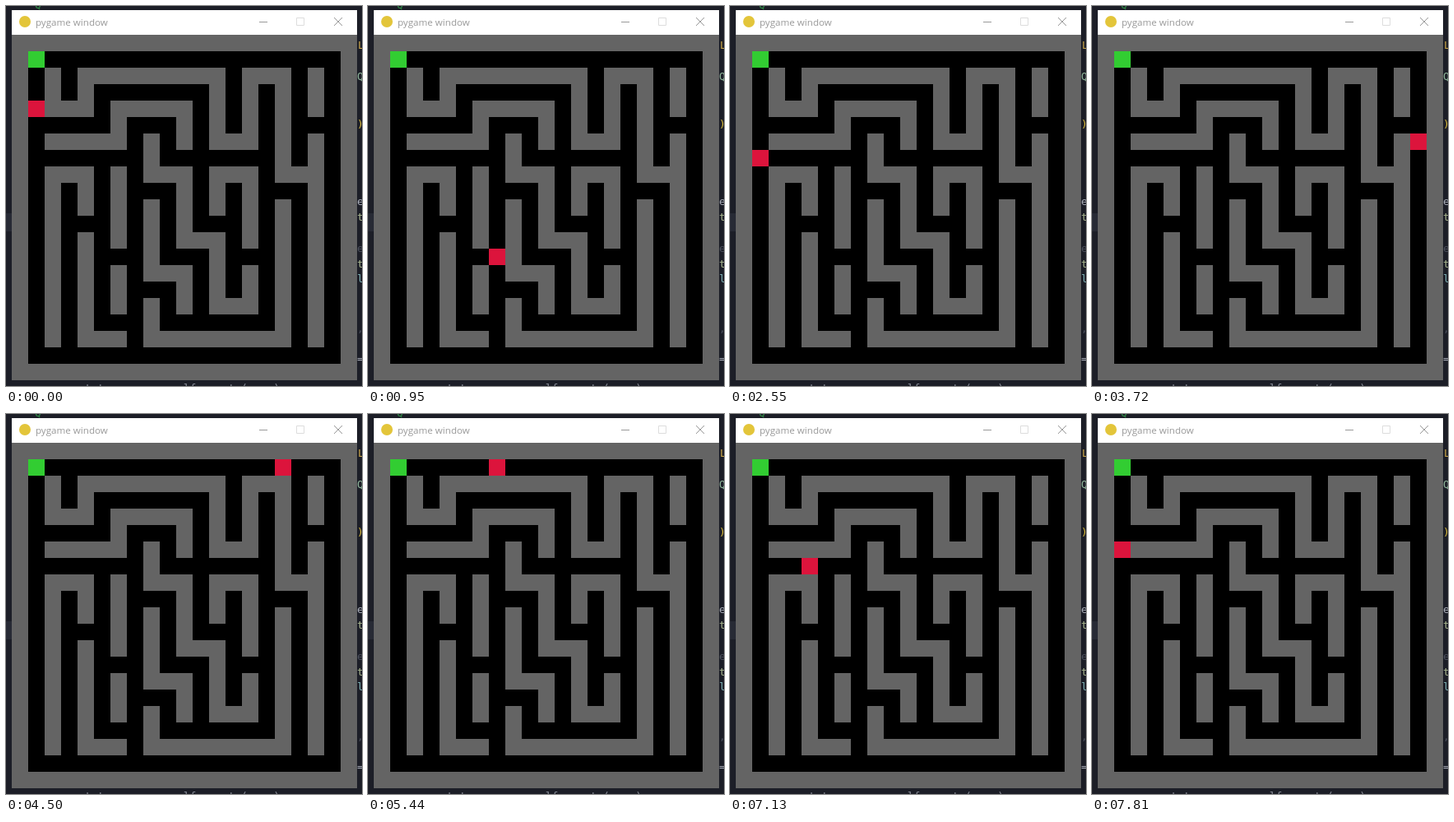
Animation of 433 by 462 pixels, one loop 8 s. Source, as an HTML page:

```html
<!DOCTYPE html>
<html lang="en">
<head>
<meta charset="utf-8">
<title>Maze walk</title>
<style>
  html, body { margin: 0; width: 100%; height: 100%; overflow: hidden; background: #1c1e27; }
  svg { display: block; width: 433px; height: 462px; }
  .code { font: 13px "DejaVu Sans Mono", monospace; }
  .title { font: 11.6px "Open Sans", sans-serif; fill: #999; }
  .walls { fill: none; stroke: #646464; stroke-linecap: square; }
</style>
</head>
<body>
<svg viewBox="0 0 433 462">
  <rect width="433" height="462" fill="#1c1e27"/>
  <rect y="252" width="7" height="22" fill="#272a35"/>
  <g id="code" class="code"></g>

  <rect x="7" y="5" width="420" height="30" fill="#fff"/>
  <circle cx="23" cy="19" r="7" fill="#e3c53a"/>
  <text class="title" x="36" y="24">pygame window</text>
  <g fill="none" stroke="#999">
    <path d="M308 19.5H318"/>
    <path d="M353.500 14.500h9v9h-9z" stroke="#ddd"/>
    <path d="M399 14L409 24M409 14L399 24"/>
  </g>

  <rect x="7" y="35" width="420" height="420" fill="#646464"/>
  <rect x="27" y="55" width="380" height="380"/>
  <g transform="translate(7 35) scale(20)">
    <path class="walls" transform="translate(.5 .5)" d="
      M2 2V4H4V2H12V6H14V2H16V8H18 M18 6V18 M18 2V4
      M2 6H6V4H10V6 M8 6V8H10V12H12V16H14V14
      M2 18V8H4V10 M6 8V12 M6 14V16 M4 12V18H6
      M8 10V14H10V16 M8 16V18H16V10 M12 10V8H14V12"/>
    <rect x="1" y="1" width="1" height="1" fill="#32cd32"/>
    <rect id="agent" width="1" height="1" fill="#dc143c"/>
  </g>
</svg>
<script>
const LOOP = 8000;
const agent = document.getElementById("agent");

// Editor text showing around the window: x, baseline, colour, text
const scraps = [
  [35, 3, "#2f8f46", "Q"],
  [428, 52, "#c9a548", "L"], [427, 90, "#8fb59a", "Q"], [427, 148, "#d8b93c", ")"],
  [427, 242, "#a9adb8", "e"], [427, 261, "#a9b58f", "t"], [427, 299, "#4b4f5c", "e"],
  [427, 318, "#a9b58f", "t"], [427, 336, "#7fb0b5", "l"], [427, 396, "#4b4f5c", ","],
  [427, 433, "#a9adb8", "="],
  [88, 469, "#8a8e99", "state"], [182, 469, "#8a8e99", "="],
  [200, 469, "#8a8e99", "self.reset"], [286, 469, "#8a8e99", "(maze)"]
];
document.getElementById("code").innerHTML = scraps
  .map(([x, y, fill, s]) => `<text x="${x}" y="${y}" fill="${fill}">${s}</text>`).join("");

// Each walk: starting cell, then runs of direction and length
const walks = [
  [1, 4, "u2"],
  [5, 10, "d3r2u4d1u3l6u2d1u4"],
  [19, 8, "u7l17"],
  [7, 12, "u5l4r1l3u1"]
];
const dirs = { u: [0, -1], d: [0, 1], l: [-1, 0], r: [1, 0] };
const cells = walks.flatMap(([x, y, runs]) => {
  const path = [[x, y]];
  for (const [, dir, n] of runs.matchAll(/([udlr])(\d+)/g)) {
    for (let i = 0; i < n; i++) {
      x += dirs[dir][0];
      y += dirs[dir][1];
      path.push([x, y]);
    }
  }
  return path;
});

// Step number and its time in ms; steps between are evenly spaced
const beats = [
  [0, 0], [1, 70], [2, 180], [3, 400], [8, 950], [9, 1100], [10, 1180], [18, 2090],
  [19, 2240], [22, 2550], [23, 2630], [29, 3270], [30, 3490], [32, 3720], [33, 3800],
  [40, 4500], [41, 4670], [49, 5440], [50, 5590], [51, 5670], [52, 5900], [54, 6100],
  [55, 6310], [57, 6510], [58, 6590], [61, 6900], [62, 6970], [69, 7810]
];

function stepAt(t) {
  const next = beats.findIndex(b => b[1] > t);
  if (next < 0) return cells.length - 1;
  const [s0, t0] = beats[next - 1], [s1, t1] = beats[next];
  return Math.floor(s0 + (s1 - s0) * (t - t0) / (t1 - t0) + 1e-6);
}

function draw(t) {
  const [x, y] = cells[stepAt(t)];
  agent.setAttribute("x", x);
  agent.setAttribute("y", y);
}

const start = performance.now();
function tick() {
  draw((performance.now() - start) % LOOP);
  requestAnimationFrame(tick);
}
tick();
</script>
</body>
</html>
```
